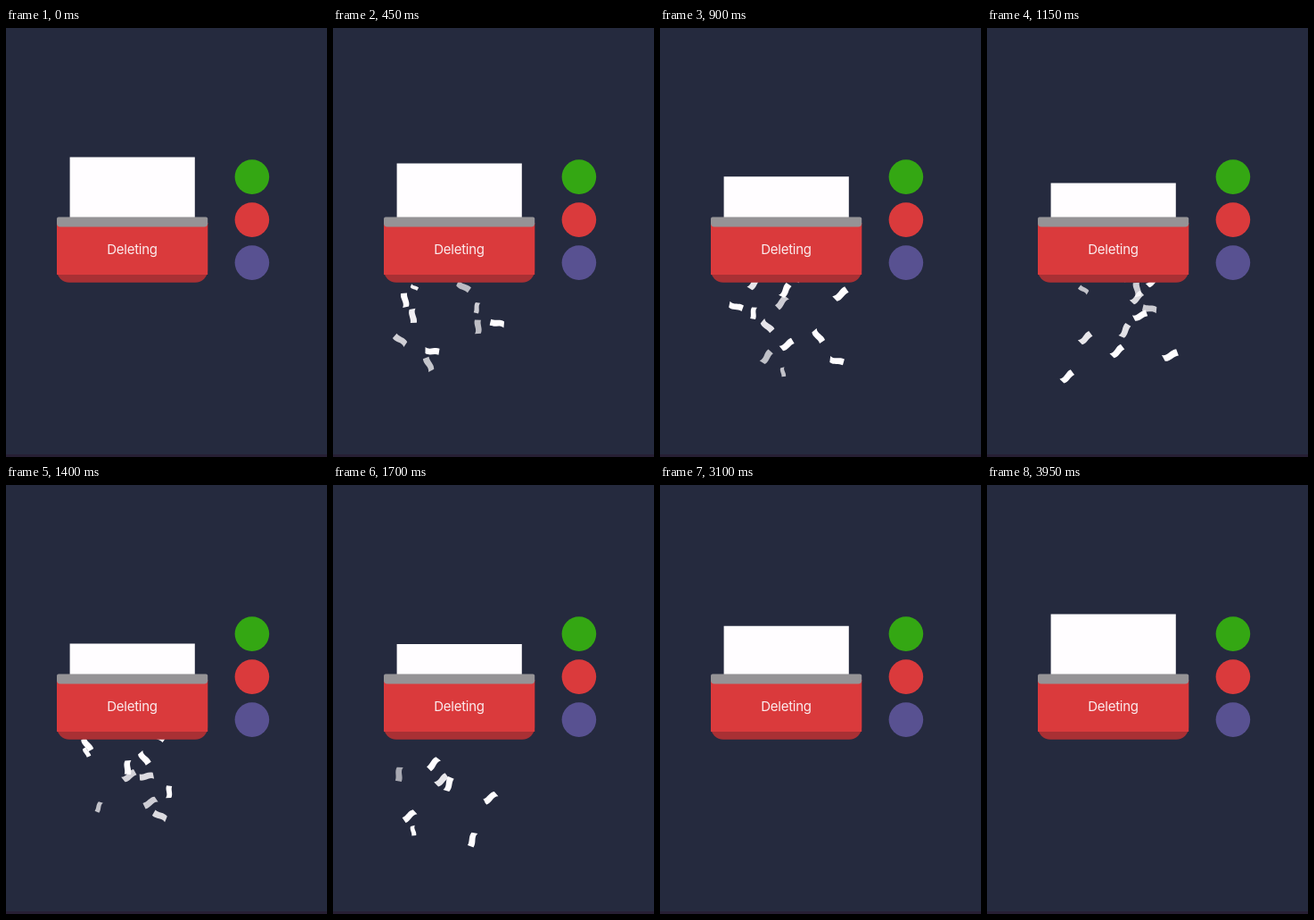
Write an HTML page with a canvas that moves like this. It is 360x480 px and loops after 4100 ms.

```html
<!DOCTYPE html>
<html lang="en">
<head>
<meta charset="utf-8">
<title>Shredder</title>
<style>
html, body { margin: 0; width: 100%; height: 100%; overflow: hidden; background: #252a3e; }
canvas { display: block; }
</style>
</head>
<body>
<canvas id="stage" width="360" height="480"></canvas>
<script>
const ctx = document.getElementById('stage').getContext('2d');
const LOOP = 4100, STEP = 50;
const SLOT_Y = 262, GRAVITY = 500;
const COUNT = 43, FIRST = -0.08, LAST = 1.42;

let seed = 11;
function rand(lo = 0, hi = 1) {
  seed = (seed * 16807) % 2147483647;
  return lo + (hi - lo) * seed / 2147483647;
}

// The slot sheds scraps at a steady rate while the paper goes down
const scraps = Array.from({ length: COUNT }, (_, i) => ({
  born: FIRST + (LAST - FIRST) * i / (COUNT - 1),
  life: rand(0.47, 0.58),
  x: rand(80, 200),
  drift: rand(-25, 25),
  fall: rand(75, 120),
  angle: rand(-90, 90),
  spin: rand(-450, 450),
  size: rand() < 0.6 ? 1 : rand(0.5, 1.1),
  alpha: rand() < 0.5 ? 1 : rand(0.6, 0.95)
}));

function drawScrap(s, t) {
  const age = t - s.born;
  if (age < 0 || age > s.life) return;
  ctx.save();
  ctx.translate(s.x + s.drift * age, SLOT_Y + s.fall * age + GRAVITY * age * age / 2);
  ctx.rotate((s.angle + s.spin * age) * Math.PI / 180);
  ctx.scale(s.size, s.size);
  ctx.globalAlpha = s.alpha;
  ctx.fillStyle = '#fffdff';
  ctx.beginPath();
  ctx.moveTo(-8, -4);
  ctx.bezierCurveTo(-3, 0, 2, -5, 8, -2.5);
  ctx.lineTo(7, 4.5);
  ctx.bezierCurveTo(2, 2.5, -3, 6, -8, 3);
  ctx.fill();
  ctx.restore();
}

function rect(color, x, y, w, h, radii = 0) {
  ctx.fillStyle = color;
  ctx.beginPath();
  ctx.roundRect(x, y, w, h, radii);
  ctx.fill();
}

function disc(color, y) {
  ctx.fillStyle = color;
  ctx.beginPath();
  ctx.arc(275.9, y, 19.3, 0, 2 * Math.PI);
  ctx.fill();
}

function ease(t, start, length) {
  const p = Math.min(1, Math.max(0, (t - start) / length));
  return (1 - Math.cos(Math.PI * p)) / 2;
}

function draw(ms) {
  const t = ms / 1000;
  rect('#252a3e', 0, 0, 360, 480);
  rect('#271f34', 0, 477, 360, 3);

  for (const s of scraps) drawScrap(s, t);

  const top = 144.5 + 33.4 * (ease(t, 0, 1.5) - ease(t, 2.25, 1.5));
  rect('#fffdff', 71.6, top, 140.2, 214 - top);

  rect('#a93034', 57, 218, 169.2, 66.8, [0, 0, 14, 14]);
  rect('#da3a3c', 57, 218, 169.2, 58);
  rect('#959396', 57, 211.6, 169.2, 10.9, [2, 2, 4, 4]);

  ctx.fillStyle = '#fbecee';
  ctx.font = '15px Inter, Roboto, sans-serif';
  ctx.letterSpacing = '-0.25px';
  ctx.textAlign = 'center';
  ctx.fillText('Deleting', 141.5, 253);

  disc('#34a713', 166.6);
  disc('#da3a3c', 214.6);
  disc('#585191', 262.6);
}

const start = performance.now();
function frame() {
  const ms = (performance.now() - start) % LOOP;
  draw(Math.floor(ms / STEP) * STEP);
  requestAnimationFrame(frame);
}
frame();
</script>
</body>
</html>
```
